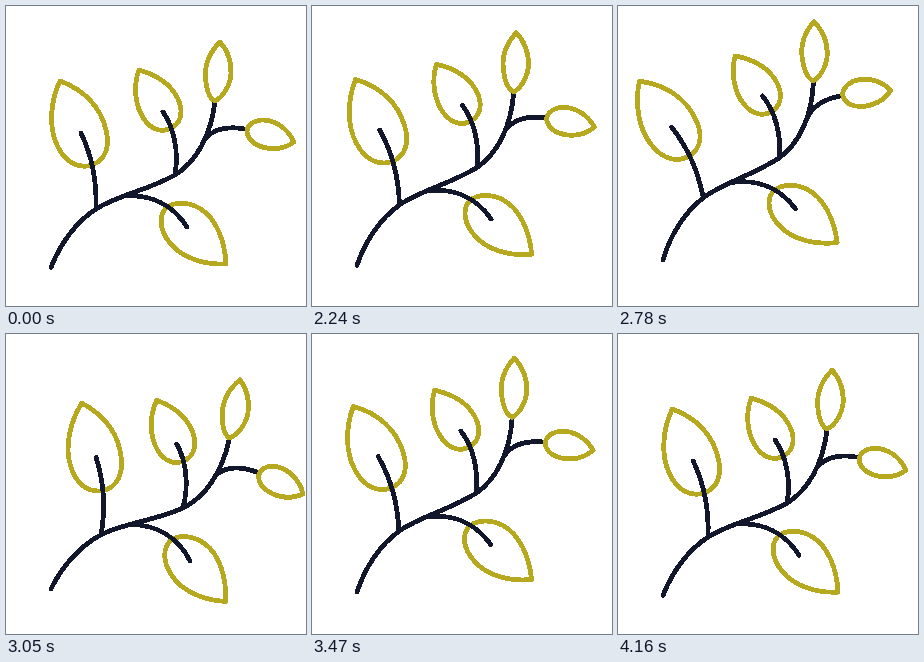
Animation of 300 by 300 pixels, one loop 4190 ms. Source, as an HTML page:

```html
<!DOCTYPE html>
<html>
<head>
<meta charset="utf-8">
<style>
  html, body { margin: 0; width: 100%; height: 100%; overflow: hidden; background: #fff; }
  svg { display: block; width: 100%; height: 100%; }
  path {
    fill: none; stroke-width: 4.8; stroke-linecap: round; stroke-linejoin: round;
    shape-rendering: crispEdges;
  }
  .leaf { stroke: #b6a920; }
  .stem { stroke: #12172b; }
</style>
</head>
<body>
<svg viewBox="0 0 300 300">
  <g id="plant">
    <path class="leaf" d="M133 64C127 80 129 100 138 113C146 125 158 127 167 121C176 115 177 104 172 93C165 78 151 69 133 64Z"/>
    <path class="leaf" d="M220 258C198 259 176 252 164 237C154 225 152 211 160 202C169 195 183 196 194 202.5C210 212 219 235 220 258Z"/>
    <path class="stem" d="M157 106C168 122 173 145 169 169"/>
    <path class="stem" d="M118 190C145 188 167 199 181 221"/>
    <path class="stem" d="M45 261.5C54 238 70 216 90 203C112 189 140 185 169 169C190 156 205 130 209 95"/>
    <path class="leaf" d="M214 36C204 46 199 58 199.5 70C200 82 203 92 209 95C217 91 224 80 225 68C225.5 56 222 45 214 36Z"/>
    <g id="bigLeaf">
      <path class="leaf" d="M54 75C45 94 42 120 51 139C59 157 73 163 86 159C100 154 104 140 100 124C95 102 79 84 54 75Z"/>
      <path class="stem" d="M75 127C86 150 91 175 90 203"/>
    </g>
    <g id="endLeaf">
      <path class="stem" d="M200 132C208 123 222 120 239 123"/>
      <path class="leaf" d="M288 136C281 121 268 114 256 114C247 115 241 119 241 126C242 134 249 139 258 141.5C269 144 280 142 288 136Z"/>
    </g>
  </g>
</svg>
<script>
  const LOOP = 4190;
  const REST = 2030;
  const MOVE = LOOP - REST;
  const PEAKS = 4;

  // Times in ms after the rest; sizes in degrees, negative leans left
  const parts = [
    { id: 'plant', x: 45, y: 261.5, begin: 20, first: 580, beat: 435, size: -9.4, decay: 0.56 },
    { id: 'bigLeaf', x: 90, y: 203, begin: 50, first: 730, beat: 400, size: -8.6, decay: 0.5 },
    { id: 'endLeaf', x: 200, y: 132, begin: 90, first: 710, beat: 380, size: -17.5, decay: 0.4 }
  ];

  // Sine ease from value a at time t0 to value b at time t1
  function ease(t, t0, t1, a, b) {
    const u = Math.min(1, Math.max(0, (t - t0) / (t1 - t0)));
    return a + (b - a) * (1 - Math.cos(Math.PI * u)) / 2;
  }

  // Each peak is opposite to the last and smaller, then the part settles
  function swing(t, { begin, first, beat, size, decay }) {
    let from = begin, value = 0;
    for (let k = 0; k < PEAKS; k++) {
      const to = first + k * beat;
      const peak = size * (-decay) ** k;
      if (t < to) return ease(t, from, to, value, peak);
      from = to;
      value = peak;
    }
    return ease(t, from, MOVE, value, 0);
  }

  function lift(t) {
    return t < 600 ? ease(t, 0, 600, 0, -8) : ease(t, 600, MOVE, -8, 0);
  }

  function draw(time) {
    const t = time % LOOP - REST;
    for (const part of parts) {
      const dy = part.id === 'plant' ? lift(t) : 0;
      document.getElementById(part.id).setAttribute('transform',
        `translate(0 ${dy}) rotate(${swing(t, part)} ${part.x} ${part.y})`);
    }
  }

  const start = performance.now();
  function tick() {
    draw(performance.now() - start);
    requestAnimationFrame(tick);
  }
  tick();
</script>
</body>
</html>
```
